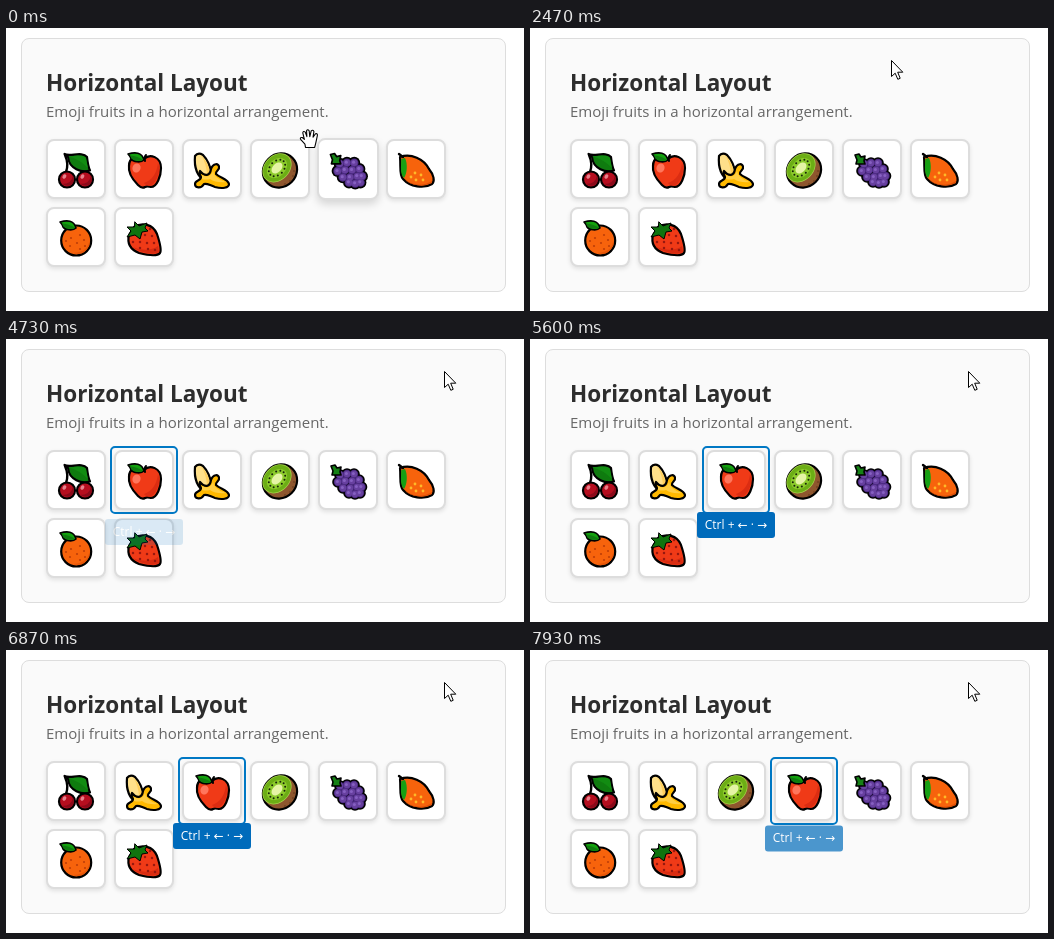
An HTML page that plays this animation: 518x283 px, repeating every 8 s.

```html
<!DOCTYPE html>
<html lang="en">
<head>
<meta charset="utf-8">
<title>Horizontal Layout</title>
<style>
html, body { margin: 0; width: 100%; height: 100%; overflow: hidden; background: #fff; }
body { font-family: "Open Sans", "Noto Sans", "DejaVu Sans", sans-serif; position: relative; }
body * { position: absolute; box-sizing: border-box; margin: 0; white-space: nowrap; }
svg * { position: static; }
#panel { left: 15px; top: 10px; width: 485px; height: 254px; background: #fafafa; border: 1px solid #ddd; border-radius: 8px; }
h2 { left: 40px; top: 40px; font-size: 22.5px; line-height: 30px; color: #2d2d2d; }
p { left: 40px; top: 73px; font-size: 15px; line-height: 20px; color: #666; }
.card { width: 60px; height: 60px; background: #fff; border: 2px solid #ddd; border-radius: 8px; box-shadow: 0 2px 4px rgba(0,0,0,.1); }
.card svg { left: -2px; top: -2px; width: 60px; height: 60px; }
#ring { top: 107px; width: 68px; height: 68px; border: 2px solid #0078c4; border-radius: 5px; }
#tip { top: 173px; width: 78.6px; height: 26px; line-height: 26px; font-size: 12px; text-align: center; color: #fff; background: #006bbb; border-radius: 3px; }
#cursor { left: 0; top: 0; width: 24px; height: 24px; overflow: visible; }
</style>
</head>
<body>
<div id="panel"></div>
<h2>Horizontal Layout</h2>
<p>Emoji fruits in a horizontal arrangement.</p>
<div id="cards"></div>
<div id="ring"></div>
<div id="tip">Ctrl + ← · →</div>
<svg id="cursor" fill="#fff" stroke="#000" stroke-linejoin="round">
  <path id="hand" transform="scale(1.08)" d="M6 18L5.5 15L1.5 10.5Q.5 8.5 3 8.8L5 10.5L3.5 4.5Q4 2.5 5.8 3.8L7.3 8L7 2.5Q8 .6 9.4 2.5L10 8L11.3 2.6Q13 1.3 13.8 3.3L13 8.5L15.3 5.3Q17.3 4.8 17 7L15.5 14L14.5 18Z"/>
  <path id="arrow" d="M.5 .5V16.5L4.2 13.2L6.8 19.3L9.2 18.3L6.7 12.2H11.8Z"/>
</svg>
<script>
const $ = id => document.getElementById(id);

// Fruit shapes, each in a 60 x 60 box
const shape = (d, fill, line = 2.2) =>
  `<path d="${d}" fill="${fill}" stroke="#000" stroke-width="${line}" stroke-linejoin="round" stroke-linecap="round"/>`;
const patch = (d, fill) => `<path d="${d}" fill="${fill}"/>`;
const stroke = (d, color, w = 1.5) =>
  `<path d="${d}" fill="none" stroke="${color}" stroke-width="${w}" stroke-linecap="round"/>`;
const oval = (x, y, rx, ry, fill, turn = 0, line = 0) =>
  `<ellipse cx="${x}" cy="${y}" rx="${rx}" ry="${ry}" fill="${fill}" transform="rotate(${turn} ${x} ${y})" stroke="#000" stroke-width="${line}"/>`;
const dots = (points, r, fill) => points.map(([x, y]) => oval(x, y, r, r, fill)).join("");

const cherry = x => oval(x, 40.5, 8, 8, "#b50e1f", 0, 2.2)
  + patch(`M${x + 6} 36Q${x + 5} 45 ${x - 5} 45Q${x + 5} 50 ${x + 7} 41Z`, "#8b0a1a")
  + oval(x - 2.6, 37.5, 1.8, 2.3, "#e8818c", 35);

const leaf = shape("M14 15C21 13 28 13 30 21C27 24 19 23 17 20Q16 17 14 15Z", "#13a10e", 1.6)
  + patch("M16 16.5Q24 17 29 21Q21 23 17.5 19.5Z", "#0f7b0f");

const berries = [[22,25],[29,24],[36,24],[20,32],[27,31],[34,31],[41,30],
  [25,38],[32,38],[39,37],[43.5,37],[31,43],[37,44],[42,43]];

const seeds = Array.from({ length: 12 }, (_, i) => {
  const a = i * Math.PI / 6;
  const u = 9.4 * Math.cos(a), v = 6.8 * Math.sin(a);
  return [27 + (u + v) * .707, 29 + (v - u) * .707];
});

const fruits = {
  cherries: stroke("M19 16Q23 25 20 33M24 20Q35 26 38 33", "#000", 2.4)
    + shape("M18.5 15C24 18 36 12 41 18Q42 27 44 31.5C36 34 23 30 22 18Z", "#0f7b0f")
    + patch("M22 17C28 18 36 14 40 19L42 29Q33 20 22 17Z", "#128c12")
    + cherry(21) + cherry(39),
  apple: shape("M30 20C36 14 47 18 47 29C47 37 43 48 37 48Q33 47 31 48Q28 50 24 46C18 40 14 34 15 27C15 18 23 16 30 20Z", "#f03a17")
    + patch("M44 24C48 34 41 45 36 47Q31 46 30 44Q42 40 44 24Z", "#dc2d12")
    + oval(22.5, 29, 4, 4.6, "#ff765c", 25)
    + leaf + stroke("M31 22Q30 18 32 16", "#000", 2),
  banana: shape("M13 17Q16 13 21 16C27 22 29 29 30 37L23 42C15 37 12 28 13 17Z", "#ffe08a")
    + patch("M19 16C25 23 28 29 28 36L25 38Q25 25 19 16Z", "#ffcf5c")
    + shape("M29 30C31 24 37 24 37 28C38 31 33 32 34 35C38 39 46 40 47 45C47 49 40 50 33 48C27 46 25 44 22 45C19 50 13 49 13 45C13 41 19 42 19 38C18 36 17 34 18 32C23 38 28 37 29 30Z", "#ffb900")
    + patch("M20 36C25 39 30 37 31 31Q31 39 44 43Q34 44 28 40Q24 41 20 40Z", "#ffce43"),
  kiwi: oval(30, 31.5, 17.8, 16.4, "#8e562e", -45, 2.2)
    + oval(27, 28.8, 16.3, 12.6, "#a5d14a", -45)
    + oval(27, 28.8, 15.6, 11.9, "#6cae15", -45)
    + oval(27, 29, 11.5, 8.5, "#8dcb2c", -45)
    + oval(27, 29, 6.5, 4.3, "#e5f4a5", -45)
    + dots(seeds, 1, "#172408")
    + dots([[40,42],[43,37],[35,45],[44,32]], .8, "#60361b"),
  grapes: dots(berries, 5.8, "#000") + dots(berries, 4.2, "#4a2a80")
    + dots(berries, 3.2, "#67409f") + dots(berries.map(([x, y]) => [x - .6, y - .6]), 1.5, "#8660c2")
    + shape("M13 16L17 15L19 18L23 17L22 22L23 25L18 25L14 25L15 21Z", "#168116", 1.6),
  mango: shape("M14 18C25 14 38 20 43 30C48 36 49 42 46 45C38 50 24 48 17 40C13 36 15 28 14 18Z", "#f7630c")
    + stroke("M13 15L17 18", "#000", 2.4)
    + patch("M15.3 20C15 28 14 35 18 39C21 35 22 25 19 19Z", "#16a014")
    + patch("M19 41C27 47 39 47 46 42L46 44C38 48 25 47 19 41Z", "#d94e08")
    + dots([[25,38],[30,41],[35,36],[29,34],[37,41]], 1.4, "#ffb928"),
  orange: oval(30.2, 33.5, 15, 15, "#f7630c", 0, 2.2)
    + patch("M43 27Q46 45 27 46Q38 50 43.5 38Z", "#e65608")
    + dots([[25,31],[34,28],[38,33],[31,36],[24,39],[34,42],[39,39],[20,34]], 1.1, "#bd3e08")
    + leaf,
  strawberry: shape("M20 20C28 15 39 17 43 27C46 36 48 43 46 46C43 50 33 48 25 46C15 42 13 36 15 28Z", "#f03a17")
    + patch("M44 39L45 45Q40 48 33 46Q24 44 18 40Q34 46 44 39Z", "#d92c11")
    + dots([[36,22],[31,28],[38,29],[26,35],[33,36],[40,36],[19,35],[26,41],[34,42],[41,43]], 1.25, "#981910")
    + shape("M21 15L25 19L33 16L31 21L34 24L28 25L26 32L21 28L13 30L17 24L13 20L20 20Z", "#10740f", 1)
};

const names = Object.keys(fruits);
const cards = names.map(name => {
  const card = document.createElement("div");
  card.className = "card";
  card.innerHTML = `<svg viewBox="0 0 60 60">${fruits[name]}</svg>`;
  $("cards").append(card);
  return card;
});
const GRAPES = names.indexOf("grapes");
const slotX = i => 40 + 68 * (i % 6);

// Key presses: [time, focused slot]; from MOVE_FROM on they carry the apple along
const presses = [[2730,0],[3330,1],[3530,2],[3870,3],[4470,2],[4730,1],[5400,2],
  [5800,3],[6000,4],[6530,3],[6800,2],[7130,1],[7600,2],[7800,3]];
const MOVE_FROM = 5400;

// Pointer path: [time, x, y]
const path = [[0,293,100],[70,284,84],[130,268,68],[200,271,54],[270,298,43],[330,329,36],
  [400,352,33],[470,361,32],[2470,361,32],[2530,385,32],[2600,422,32],[2670,438,32]];

function draw(t) {
  const last = presses.findLastIndex(p => p[0] <= t);
  const [since, slot] = presses[last] || [0, 0];
  const moving = t >= MOVE_FROM;

  const order = names.map((_, i) => i);
  if (moving) {
    order.splice(1, 1);
    order.splice(slot, 0, 1);
  }
  order.forEach((fruit, i) => {
    cards[fruit].style.left = slotX(i) + "px";
    cards[fruit].style.top = (i < 6 ? 111 : 179) + "px";
  });

  const hover = Math.max(0, 1 - t / 190);
  const grapes = cards[GRAPES].style;
  grapes.transform = hover ? `scale(${1 + .035 * hover})` : "none";
  grapes.boxShadow = `0 ${2 + 2 * hover}px ${4 + 4 * hover}px rgba(0,0,0,${.1 + .05 * hover})`;

  $("ring").style.display = last < 0 ? "none" : "block";
  $("ring").style.left = slotX(slot) - 4 + "px";

  // The hint fades in again unless the apple moves back
  const steady = moving && slot < presses[last - 1][1];
  const shown = steady ? 1 : Math.min(1, .14 + (t - since) * .0043);
  const tip = $("tip").style;
  tip.display = last < 1 ? "none" : "block";
  tip.left = slotX(slot) - 9.3 + "px";
  tip.opacity = shown;
  tip.transform = `translateY(${8 * (1 - shown)}px)`;

  const [, x, y] = path.findLast(p => p[0] <= t);
  $("cursor").style.transform = `translate(${x}px, ${y}px)`;
  $("hand").style.display = t < 70 ? "" : "none";
  $("arrow").style.display = t < 70 ? "none" : "";
}

// Motion advances at 15 steps a second
const STEP = 200 / 3;
function tick() {
  const t = performance.now() % 8000;
  draw(Math.round(Math.floor((t + 3.4) / STEP) * STEP / 10) * 10);
  requestAnimationFrame(tick);
}
tick();
</script>
</body>
</html>
```
